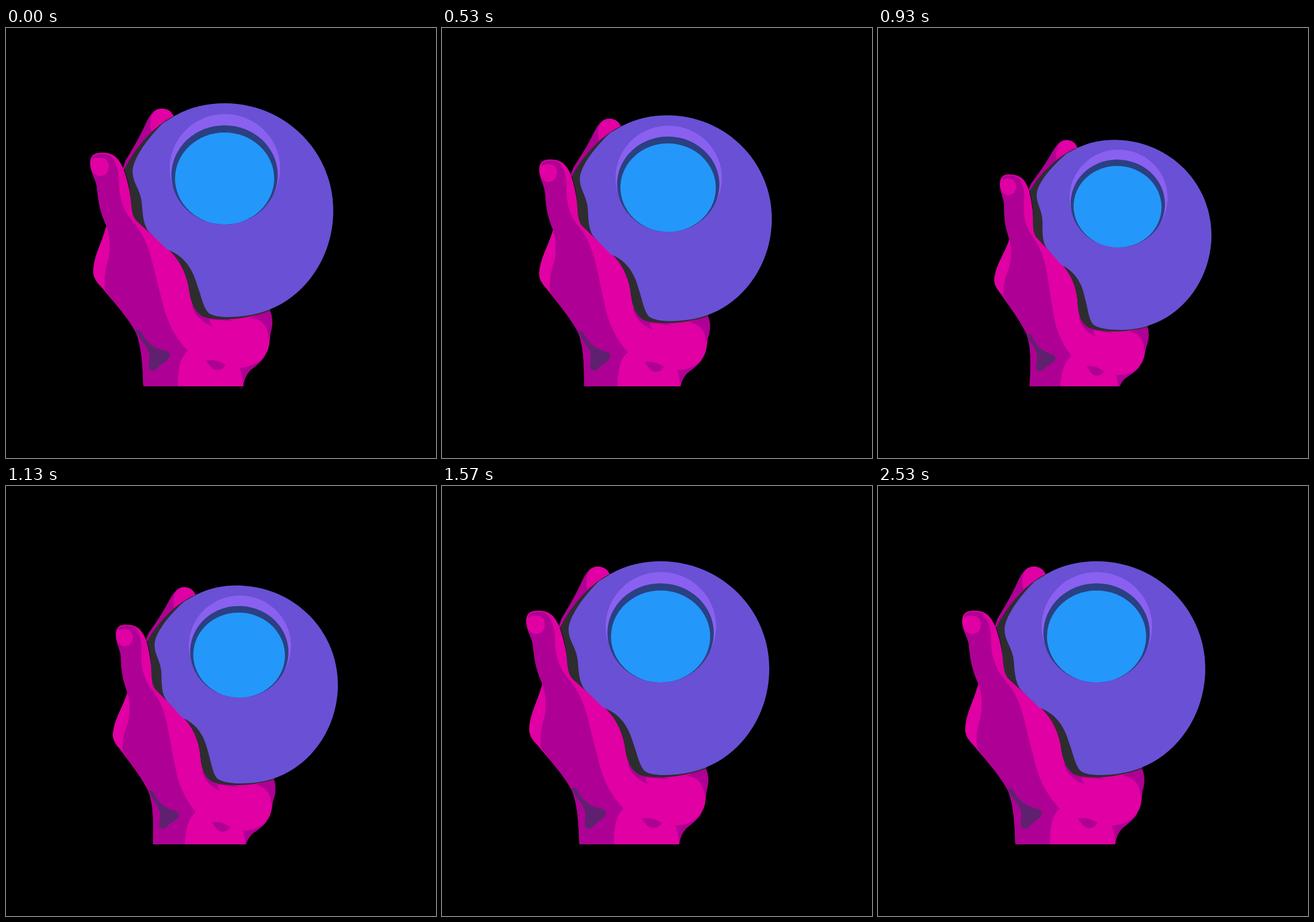
An HTML page that plays this animation: 720x720 px, repeating every 2560 ms.

```html
<!DOCTYPE html>
<html lang="en">
<head>
<meta charset="utf-8">
<title>Hand and eyeball</title>
<style>
  html, body { margin: 0; width: 100%; height: 100%; overflow: hidden; background: #000; }
  svg { display: block; width: 100%; height: 100%; }
  .pink { fill: #e000a3; }
  .dark { fill: #ae0094; }
  .shade { fill: #2d2d30; }
  .ball { fill: #6a50d4; }
  .scar { fill: #602070; }
</style>
</head>
<body>
<svg viewBox="0 0 720 720">
  <g id="figure">
    <!-- far finger -->
    <path class="dark" d="M194 240 L200 222 C215 198 225 180 234 160 C243 141 250 135 261 135 C271 135 277 140 281 148 L240 200Z"/>
    <path class="pink" d="M246 143 C250 137 255 135 261 135 C271 135 277 140 281 148 L243 173 C241 160 241 150 246 143Z"/>

    <!-- palm and thumb -->
    <path class="pink" d="M141 228 C140 215 147 209 158 209 C172 208 182 212 189 222 C198 234 204 256 209 285
      C211 304 212 316 221 325 L240 342 L270 369 C288 384 301 407 306 434 C309 456 313 470 330 480 L375 470 L441 472
      C447 482 447 498 443 510 C441 522 442 530 438 540 C431 556 418 566 409 573 C401 582 399 589 397 600 L394 635
      L230 635 L230 600 C229 565 227 527 215 505 C198 477 177 455 160 434 C151 425 146 417 146 408
      C147 380 160 362 168 331 C156 303 155 291 152 265 C149 250 142 243 141 228Z"/>
    <path class="dark" d="M145 216 C152 210 165 209 175 214 C184 223 188 236 189 250 C189 270 190 285 199 304
      C205 318 216 326 222 337 C243 366 248 410 261 455 C268 490 283 518 304 540 C292 553 288 566 288 600 L288 635
      L230 635 L230 600 C229 565 227 527 215 505 C199 478 181 459 166 439 C164 425 165 407 171 389
      C176 370 174 348 168 331 C156 303 155 291 152 265 C150 252 144 245 142 235Z"/>
    <path class="pink" d="M141 229 C141 220 147 217 157 217 C167 217 172 223 172 232 C172 242 166 248 157 248 C148 248 143 239 141 229Z"/>
    <path class="scar" d="M217 507 Q222 503 227 510 C233 523 246 537 267 540 Q276 543 274 550 C270 560 258 562 253 571 Q246 577 240 571 C237 562 243 551 238 541 C234 529 223 521 217 507Z"/>
    <path class="dark" d="M334 557 Q351 553 368 564 L362 571 Q352 575 345 570Z"/>
    <path class="dark" d="M409 485 L441 472 C447 482 447 498 443 510 L440 521 C439 503 432 488 409 485Z"/>
    <path class="dark" d="M391 569 C409 568 424 561 435 547 C429 558 418 566 409 573 C401 582 399 589 397 600 Q397 582 391 569Z"/>
    <path class="dark" d="M311 464 C315 481 328 493 347 500 Q341 495 341 488 L380 491 L340 475Z"/>

    <!-- ball with its shadow edge -->
    <path class="shade" d="M284 146 C250 160 212 205 198 238 C207 260 208 280 210 300 C212 314 214 320 223 327 L240 342
      L270 369 C288 384 301 407 306 434 C309 459 314 473 329 483 C350 491 398 490 443 473 L400 300Z"/>
    <path class="ball" d="M283 147 C308 132 338 126 366 126 C467 126 548 206 548 306 C548 381 504 447 440 472
      C420 480 395 484 372 484 C358 484 346 482 339 477 C330 467 328 452 320 430 C310 395 292 379 270 371
      L240 342 C231 332 229 315 228 300 C227 270 212 262 212 240 C212 222 232 190 262 160Z"/>
    <ellipse cx="366.5" cy="235" rx="92.5" ry="91" fill="#8a60f0"/>
    <ellipse cx="366" cy="246" rx="89" ry="83" fill="#2a4082"/>
    <ellipse cx="366" cy="252" rx="83" ry="77" fill="#2497fb"/>
  </g>
  <path d="M0 600H720V720H0Z"/>
</svg>
<script>
  const LOOP = 2560, STEP = 1000 / 12;
  const SWING = [0, 1, 2, 3, 3, 2, 1, 0];
  const SWINGS = 2;
  const PIVOT = [388, 673];
  const figure = document.getElementById("figure");

  // Two stepped swings, then a rest until the loop restarts.
  function draw() {
    const step = Math.floor(performance.now() % LOOP / STEP);
    const moving = step < SWINGS * SWING.length;
    const swing = moving ? SWING[step % SWING.length] / 3 : 0;
    const [x, y] = PIVOT;
    figure.setAttribute("transform",
      `translate(${x} ${y}) rotate(${5 * swing}) scale(${1 - 0.113 * swing}) translate(${-x} ${-y})`);
    requestAnimationFrame(draw);
  }
  draw();
</script>
</body>
</html>
```
